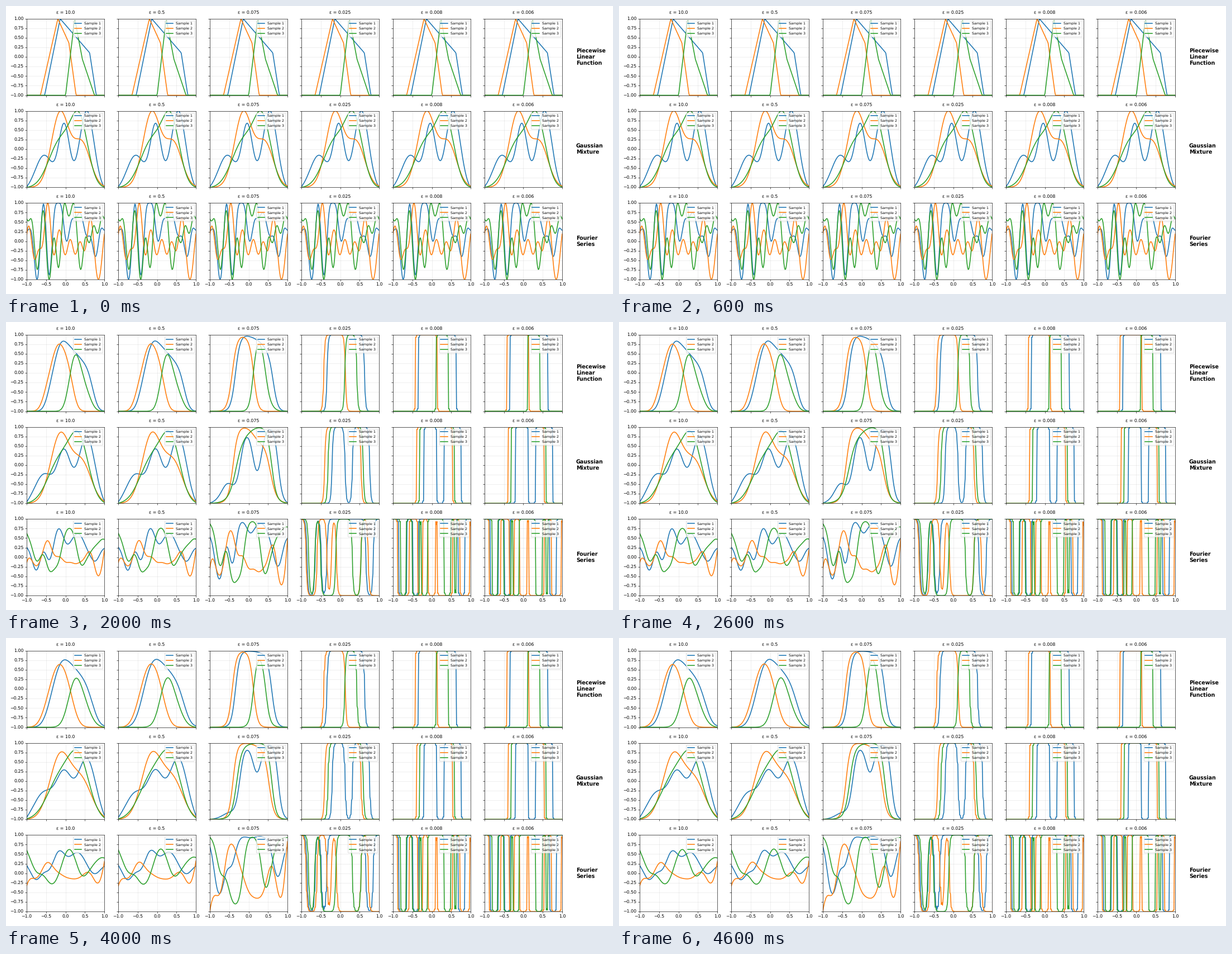
A matplotlib script for the animation above (5 s loop, 1087x515 px).

```python
import numpy as np
import matplotlib.pyplot as plt
from matplotlib.animation import FuncAnimation

W, H, DPI = 1087, 515, 57.21
FRAMES, FRAME_MS = 5, 1000
FRAME_TIME, DT = 0.0025, 5e-6   # simulated time per picture and per step
EPS = [10.0, 0.5, 0.075, 0.025, 0.008, 0.006]
COLORS = ["tab:blue", "tab:orange", "tab:green"]

x, dx = np.linspace(-1, 1, 128, retstep=True)


def rescale(u):
    return 2 * (u - u.min()) / (u.max() - u.min()) - 1


def piecewise(*corners):
    """Straight lines through the corners (x, u), -1 outside."""
    return np.interp(x, *np.transpose(corners), left=-1, right=-1)


def mixture(*bumps):
    """Sum of Gaussians given as (height, centre, width)."""
    return rescale(sum(a * np.exp(-((x - c) / s) ** 2 / 2) for a, c, s in bumps))


def fourier(*turns, order=10):
    """Least-squares periodic series with the given turning points (x, u)."""
    k = np.pi * np.arange(1, order + 1)

    def basis(q):
        a = np.outer(q, k)
        return np.hstack([np.ones((len(q), 1)), np.cos(a), np.sin(a)])

    def slope(q):
        a = np.outer(q, k)
        return np.hstack([np.zeros((len(q), 1)), -k * np.sin(a), k * np.cos(a)])

    px, pu = np.transpose(turns)
    damping = np.diag(np.concatenate([[0], k, k])) * 1e-3
    lhs = np.vstack([basis(px), slope(px) * .03, damping])
    rhs = np.concatenate([pu, np.zeros(len(px) + len(damping))])
    return rescale(basis(x) @ np.linalg.lstsq(lhs, rhs, rcond=None)[0])


SAMPLES = {
    "Piecewise\nLinear\nFunction": [
        piecewise((-.54, -1), (-.14, 1), (.62, .11), (.79, -1)),
        piecewise((-.648, -1), (-.2, 1), (.085, .37), (.27, -1)),
        piecewise((0, -1), (.235, 1), (.43, -.05), (.745, -1)),
    ],
    "Gaussian\nMixture": [
        mixture((.96, -.55, .23), (1.7, -.035, .14), (2.12, .545, .19)),
        mixture((1.95, -.14, .225), (1.14, .42, .22)),
        mixture((1.2, -.13, .3), (1.62, .36, .22)),
    ],
    "Fourier\nSeries": [
        fourier((-.93, .33), (-.735, -1), (-.57, .98), (-.42, -.88), (-.2, 1),
                (.03, 0), (.2, .6), (.36, .75), (.57, .13), (.77, -.4),
                (.94, .36), (1, .27)),
        fourier((-.95, .4), (-.79, -.48), (-.46, 1), (-.3, -.36), (-.155, .3),
                (-.02, -.35), (.13, .04), (.25, -.35), (.37, -.01),
                (.48, -.25), (.64, .6), (.845, -1)),
        fourier((-.96, .52), (-.73, -.73), (-.575, .79), (-.425, -1), (-.3, .07),
                (-.18, -.67), (-.015, 1), (.085, .6), (.18, .97), (.4, -.74),
                (.52, .15), (.6, -.07), (.71, .37), (.83, .22)),
    ],
}


def simulate():
    """Allen-Cahn flow of every sample for every epsilon."""
    u = np.repeat(np.array(list(SAMPLES.values()))[:, None], len(EPS), axis=1)
    rate = 1 / np.array(EPS)[:, None, None] ** 2
    states = [u]
    for _ in range(FRAMES - 1):
        for _ in range(round(FRAME_TIME / DT)):
            uxx = np.gradient(np.gradient(u, dx, axis=-1), dx, axis=-1)
            u = u + DT * (uxx + rate * (u - u ** 3))
        states.append(u)
    return states


states = simulate()

plt.rcParams["text.hinting"] = "none"
fig = plt.figure(figsize=((W + .001) / DPI, (H + .001) / DPI), dpi=DPI, facecolor="white")
lines = {}
for r, name in enumerate(SAMPLES):
    bottom = 159.6 + 164.75 * r
    for c, eps in enumerate(EPS):
        left = 37.2 + 163.95 * c
        ax = fig.add_axes([left / W, 1 - bottom / H, 139 / W, 136.8 / H])
        ax.set(xlim=(-1, 1), ylim=(-1, 1), xticks=np.arange(-1, 1.1, .5),
               yticks=np.arange(-1, 1.1, .25))
        ax.tick_params(labelleft=c == 0, labelbottom=r == 2)
        ax.grid(alpha=.3)
        ax.set_title(f"ε = {eps}", fontsize=10, pad=10)
        for s, color in enumerate(COLORS):
            lines[r, c, s], = ax.plot([], [], color=color, lw=2, label=f"Sample {s + 1}")
        ax.legend(loc="upper right", fontsize=8)
    fig.text(1021 / W, 1 - (bottom - 68.4) / H, name, fontsize=12,
             fontweight="bold", va="center")


def draw(frame):
    for key, line in lines.items():
        line.set_data(x, states[frame][key])
    return list(lines.values())


anim = FuncAnimation(fig, draw, frames=FRAMES, interval=FRAME_MS, repeat=True, repeat_delay=0)
plt.show()
```
